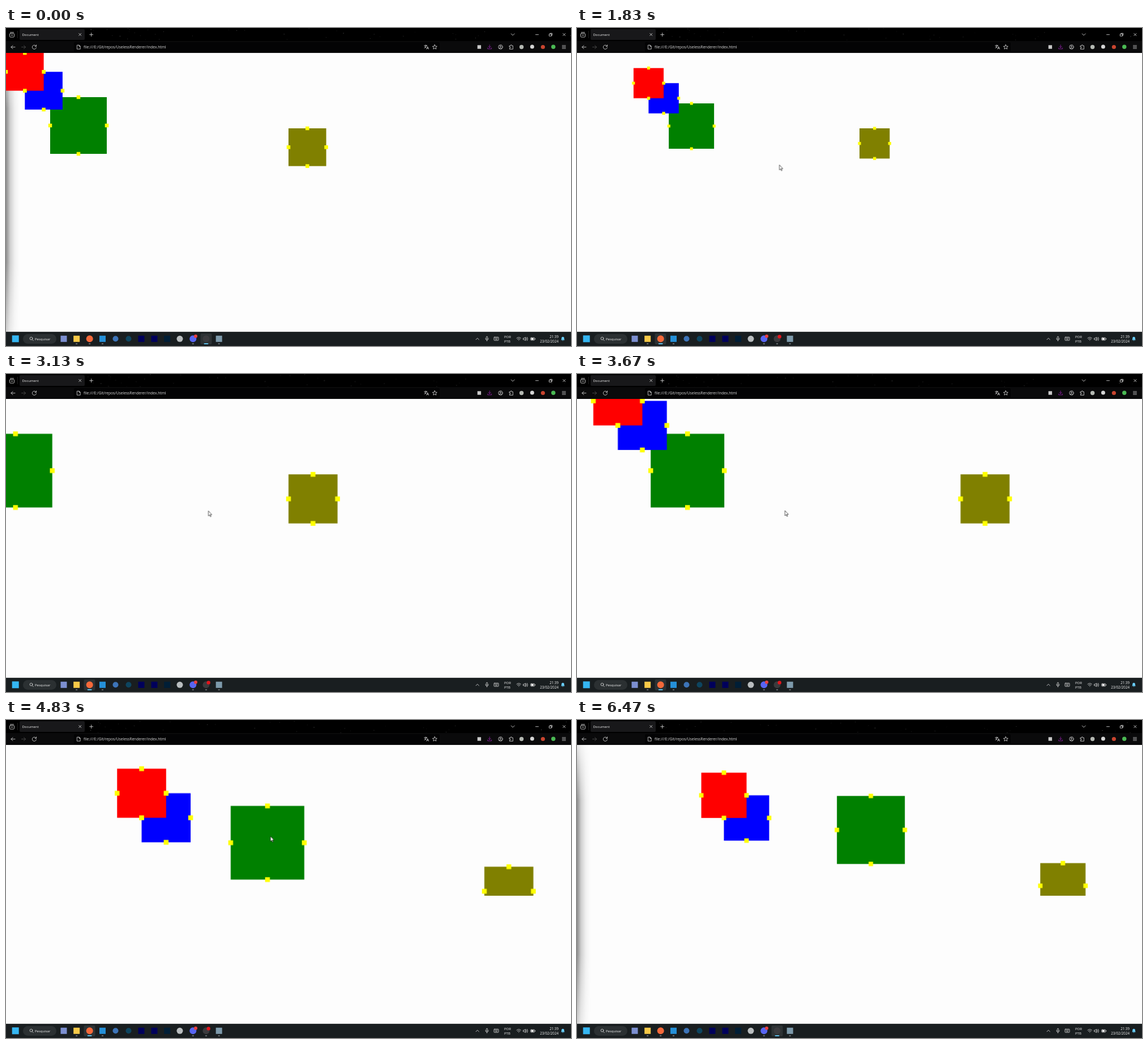
An HTML page that plays this animation: 998 px wide and 561 px high, repeating every 6.51 s.

```html
<!DOCTYPE html>
<html lang="pt-BR">
<head>
<meta charset="utf-8">
<title>Document</title>
<style>
  html, body { margin: 0; width: 100%; height: 100%; overflow: hidden; background: #000; }
  svg { display: block; }
  #screen { width: 998px; height: 561px; }
  text { font: 6px "Open Sans", "Noto Sans", sans-serif; fill: #f2f2f2; }
  .url { font-size: 6.66px; fill: #dcdcdc; }
  .clock { font-size: 6.2px; text-anchor: end; }
  .line { fill: none; stroke: #e4e4e4; stroke-width: .8; stroke-linecap: round; stroke-linejoin: round; }

  #stars, #zoom, #pan, #greenBox, #cursor, .page-focus, .other-focus {
    animation: 6510ms linear infinite;
  }
  #stars { animation-name: drift; }
  #zoom { transform-origin: 499px 177px; animation-name: zoom; animation-timing-function: step-end; }
  #pan { animation-name: pan; }
  #greenBox { animation-name: drag; }
  #cursor { animation-name: cursor; }
  .page-focus { animation-name: focus; animation-timing-function: step-end; }
  .other-focus { animation-name: blur; animation-timing-function: step-end; }

  @keyframes drift { to { transform: translate(-70px, 5px); } }
  @keyframes zoom {
    0% { transform: scale(1); }
    23% { transform: scale(.9); }
    26.1% { transform: scale(.8); }
    29.2% { transform: scale(.7); }
    39.9% { transform: scale(.8); }
    41.5% { transform: scale(.9); }
    43% { transform: scale(1); }
    44.5% { transform: scale(1.1); }
    46.1% { transform: scale(1.2); }
    47.6% { transform: scale(1.3); }
    78.3%, 100% { transform: scale(1.2); }
  }
  @keyframes pan {
    0%, 49.9% { transform: translate(0, 0); }
    56.4% { transform: translate(137.5px, 0); }
    62.2% { transform: translate(262px, 0); }
    65.3%, 68.4% { transform: translate(262px, 62.8px); }
    68.8%, 100% { transform: translate(266.1px, 62.9px); }
  }
  @keyframes drag {
    0%, 70.7% { transform: translate(0, 0); animation-timing-function: ease-in-out; }
    76.8%, 100% { transform: translate(121.6px, -43.8px); }
  }
  @keyframes cursor {
    0%, 7.7% { transform: translate(-12px, 352px); animation-timing-function: ease-out; }
    14.6%, 48.4% { transform: translate(357.5px, 241.5px); }
    51.5% { transform: translate(367px, 241px); }
    67.6%, 70.7% { transform: translate(368px, 241px); animation-timing-function: ease-in-out; }
    76.8%, 79.9% { transform: translate(526px, 184px); }
    85.6% { transform: translate(84.5px, 348px); }
    86.9%, 100% { transform: translate(-12px, 384px); }
  }
  @keyframes focus {
    0% { opacity: 0; }
    14.6% { opacity: 1; }
    95.2%, 100% { opacity: 0; }
  }
  @keyframes blur {
    0% { opacity: 1; }
    14.6% { opacity: 0; }
    95.2%, 100% { opacity: 1; }
  }
</style>
</head>
<body>
<svg id="screen" viewBox="0 0 998 561">
  <defs>
    <linearGradient id="shade">
      <stop offset="0" stop-opacity=".45"/>
      <stop offset=".3" stop-opacity=".18"/>
      <stop offset=".65" stop-opacity=".05"/>
      <stop offset="1" stop-opacity="0"/>
    </linearGradient>
    <linearGradient id="fade" x2="0" y2="1">
      <stop offset="0" stop-color="#fff" stop-opacity=".2"/>
      <stop offset=".2" stop-color="#fff"/>
      <stop offset=".75" stop-color="#fff"/>
      <stop offset="1" stop-color="#fff" stop-opacity=".4"/>
    </linearGradient>
    <mask id="shadeMask"><rect y="44" width="24" height="492" fill="url(#fade)"/></mask>
    <clipPath id="view"><rect y="44" width="998" height="266"/></clipPath>
  </defs>

  <!-- page -->
  <rect y="44" width="998" height="492" fill="#fdfdfd"/>
  <rect class="other-focus" y="44" width="24" height="492" fill="url(#shade)" mask="url(#shadeMask)"/>
  <g clip-path="url(#view)"><g id="zoom"><g id="pan"></g></g></g>

  <!-- browser bars -->
  <rect width="998" height="44"/>
  <g id="stars" fill="#a8a8a8"></g>
  <rect y="23" width="998" height="21" fill="#0a0a0b"/>
  <rect x="120" y="25" width="646" height="17" rx="2" fill="#030304"/>
  <rect x="24" y="2" width="115" height="19" rx="2" fill="#18181a"/>
  <path d="M20.5 5V18" stroke="#333" stroke-width=".6"/>
  <text x="28.5" y="14">Document</text>
  <text class="url" x="137" y="36.2">file:///E:/Git/repos/UselessRenderer/index.html</text>
  <g class="line">
    <rect x="6.5" y="9.5" width="8" height="6.5" rx="1.3"/>
    <path d="M7.5 7.7H13.5M9 12.5H12"/>
    <path d="M128.8 9.5l4 4m0-4l-4 4M147.7 11.7h6m-3-3v6"/>
    <path d="M892.2 10l3 3 3-3M935.5 11.7h5M983.8 9.5l4.2 4.2m0-4.2l-4.2 4.2"/>
    <path d="M959.7 10.7h3.8v3.5h-3.8zM961 10.5V9.3h3.7v3.6h-1"/>
    <path d="M16 33.7H9m3-3l-3 3 3 3"/>
    <path d="M27.5 33.7h7m-3-3l3 3-3 3" stroke="#555"/>
    <path d="M53 31.8a3.6 3.6 0 1 0 .5 2.7M53.6 29.8v2.5h-2.5"/>
    <path d="M125.8 30.2h3.4l2 2v5h-5.4zM129 30.3v2h2"/>
    <path d="M738.8 31h5m-2.5-1v1m1.6 0q-.8 3-3.8 4.3m.6-3q1 1.8 2 2.4M743 37.2l1.7-4.4 1.8 4.4m-2.9-1.5h2.2"/>
    <path d="M757.3 29.5l1.2 2.6 2.8.3-2.1 1.9.6 2.8-2.5-1.4-2.5 1.4.6-2.8-2.1-1.9 2.8-.3z"/>
    <path d="M854.2 29.8v4.8m-2-2l2 2 2-2M850.8 35v1.8h6.8V35" stroke="#9b23b5"/>
    <circle cx="873.5" cy="33.5" r="3.7"/>
    <circle cx="873.5" cy="32.4" r="1.1"/>
    <path d="M871.3 35.8q2.2-2 4.4 0"/>
    <path d="M889.4 31.3h2v-.6a1 1 0 0 1 2 0v.6h2v6h-6v-1.8h.8a1 1 0 0 0 0-2h-.8z"/>
    <path d="M982.5 31h6m-6 2.5h6m-6 2.5h6"/>
  </g>
  <rect x="832.7" y="30.3" width="6.4" height="6.4" fill="#c9c9c9"/>
  <circle cx="910.6" cy="33.5" r="3.7" fill="#b4b8b2"/>
  <circle cx="929.4" cy="33" r="3.5" fill="#d5d5d5"/>
  <circle cx="948.4" cy="33.5" r="3.6" fill="#c9452f"/>
  <circle cx="966.8" cy="33.3" r="3.7" fill="#4bb954"/>

  <!-- taskbar -->
  <rect y="536" width="998" height="25" fill="#191e20"/>
  <path d="M0 536.3H998" stroke="#2b3032" stroke-width=".6"/>
  <rect x="30" y="540" width="59" height="17" rx="8.5" fill="#2b3032"/>
  <g class="line">
    <circle cx="44.5" cy="547.7" r="2.4"/>
    <path d="M46.3 549.6l2 2"/>
  </g>
  <text x="51" y="551">Pesquisar</text>
  <rect class="page-focus" x="137.5" y="539" width="20" height="19" rx="2" fill="#2d3234"/>
  <rect class="other-focus" x="343.5" y="539" width="20" height="19" rx="2" fill="#2d3234"/>
  <g id="apps"></g>
  <g id="dots" fill="#9a9fa2"></g>
  <rect class="page-focus" x="143.7" y="556.3" width="8" height="1.6" rx=".8" fill="#63cfff"/>
  <rect class="other-focus" x="349.5" y="556.3" width="8" height="1.6" rx=".8" fill="#63cfff"/>
  <circle cx="335" cy="543.8" r="3" fill="#e8403f"/>
  <circle class="page-focus" cx="357.7" cy="544.4" r="3.2" fill="#e3151c"/>

  <!-- tray -->
  <g class="line">
    <path d="M830 549.8l2.7-2.7 2.7 2.7"/>
    <rect x="848.3" y="544.3" width="2.4" height="4.6" rx="1.2"/>
    <path d="M846.9 547.8q.2 2.8 2.6 2.8t2.6-2.8M849.5 550.7v1.5"/>
    <rect x="862" y="545.3" width="8" height="5.8" rx=".8"/>
    <path d="M863.7 547.2h4.6M864.5 549.3h3"/>
    <path d="M902 547.2q3.7-3.2 7.4 0M903.4 549q2.3-2 4.6 0M905.4 550.8h.6"/>
    <path d="M913.9 547.2h1.5l2-1.7v6l-2-1.7h-1.5zM919 546.8q1.2 1.6 0 3.3M920.5 545.5q2.2 3 0 6"/>
    <rect x="926.7" y="546.3" width="7" height="4.5" rx="1"/>
  </g>
  <path d="M927.5 547h4.5v3.2h-4.5zM934.2 547.6h.9v2h-.9z" fill="#e8e8e8"/>
  <text x="880" y="547">POR</text>
  <text x="880" y="555.3">PTB</text>
  <text class="clock" x="976" y="547">21:39</text>
  <text class="clock" x="976" y="555.3">23/02/2024</text>
  <path d="M980.3 550.5l.9-1.4v-2q.2-2.4 2.4-2.4t2.4 2.4v2l.9 1.4zM982.4 551.2h2.4q-1.2 1.5-2.4 0z" fill="#69cdfa"/>

  <path id="cursor" d="M0 0V9L2.1 7.1 3.5 10.3 4.8 9.7 3.4 6.6H6.1Z" fill="#fff" stroke="#111" stroke-width=".7"/>
</svg>
<script>
  const byId = id => document.getElementById(id);

  function add(parent, tag, attrs) {
    const el = document.createElementNS('http://www.w3.org/2000/svg', tag);
    for (const key in attrs) el.setAttribute(key, attrs[key]);
    parent.append(el);
    return el;
  }

  const square = (parent, cx, cy, size, fill) =>
    add(parent, 'rect', { x: cx - size / 2, y: cy - size / 2, width: size, height: size, fill });

  // A box with one yellow handle in the middle of each side.
  function box(id, x, y, size, fill) {
    const g = add(byId('pan'), 'g', { id });
    const half = size / 2, cx = x + half, cy = y + half;
    square(g, cx, cy, size, fill);
    for (const [dx, dy] of [[0, -half], [half, 0], [0, half], [-half, 0]])
      square(g, cx + dx, cy + dy, 6.5, '#ff0');
  }

  box('oliveBox', 499, 177, 66.6, '#808000');
  box('greenBox', 78, 122, 100, '#008000');
  box('blueBox', 33.3, 77.3, 66.6, '#00f');
  box('redBox', 0, 44, 66.6, '#f00');

  // Seeded star field behind the tabs.
  let seed = 17;
  const random = () => (seed = seed * 16807 % 2147483647) / 2147483647;
  for (let i = 0; i < 46; i++)
    add(byId('stars'), 'circle', {
      cx: 150 + random() * 900, cy: random() * 24 - 3,
      r: .3 + random() * .3, opacity: .3 + random() * .6
    });

  const app = (x, fill, size = 11) => square(byId('apps'), x, 548.3, size, fill);
  const roundApp = (x, fill, r = 6) => add(byId('apps'), 'circle', { cx: x, cy: 548.3, r, fill });
  app(16.7, '#35b6f2', 12);
  app(102, '#7c8fd0');
  app(124.7, '#f7c948');
  roundApp(147.7, '#f5693a');
  app(170.5, '#2590d8');
  roundApp(193.5, '#3d74b8', 5);
  roundApp(216.5, '#0d4560', 5);
  app(239, '#00005b');
  app(262, '#00005b');
  app(284.7, '#001e36');
  roundApp(307, '#b9bdbf', 5.5);
  roundApp(330.3, '#5865f2');
  roundApp(353.5, '#3b3b3e');
  app(376.2, '#7d9aab');

  for (const x of [124.7, 147.7, 170.5, 330.3, 353.5, 376.2])
    add(byId('dots'), 'rect', { x: x - 1.7, y: 556.4, width: 3.4, height: 1.4, rx: .7 });
</script>
</body>
</html>
```
